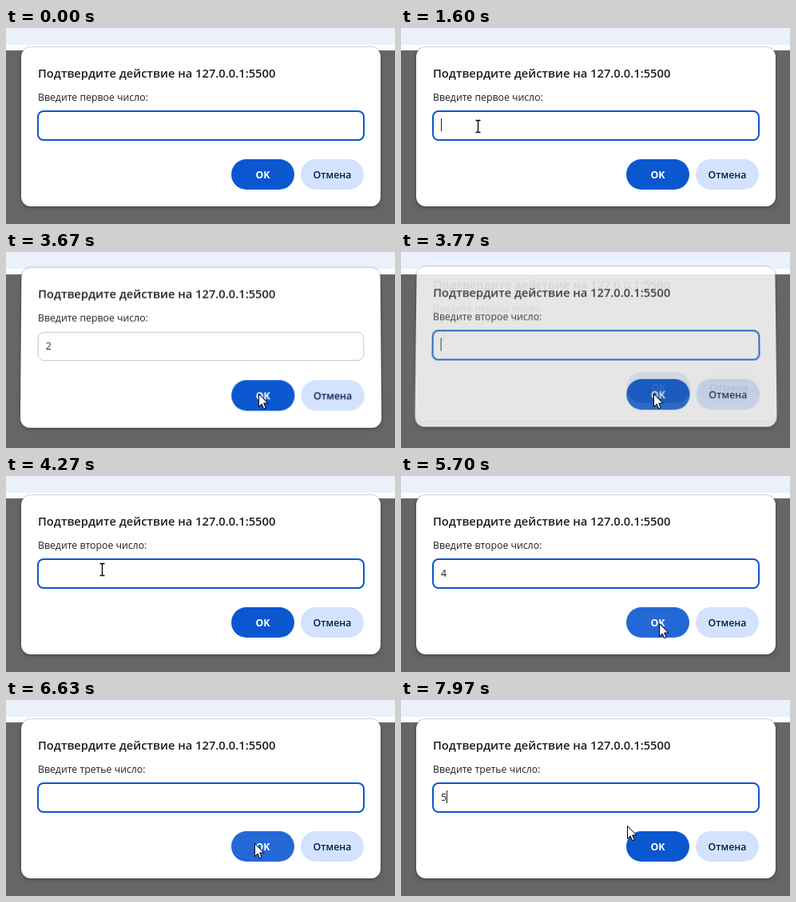
Recreate the animation shown at these times as an HTML page. Size 487 by 245 pixels, loop 8000 ms.

```html
<!DOCTYPE html>
<html lang="ru">
<head>
<meta charset="utf-8">
<title>Диалог</title>
<style>
html, body { margin: 0; width: 100%; height: 100%; overflow: hidden; }
body { position: relative; background: #666; font-family: "Open Sans", "Noto Sans", sans-serif; }
body * { position: absolute; box-sizing: border-box; white-space: pre; }
.bar { left: 0; top: 0; width: 100%; height: 28px; background: #fff; }
.bar i { left: 0; top: 0; width: 100%; height: 21px; background: #eaf1fb; }
.dialog {
  left: 19px; top: 24px; width: 450px; height: 199px; border-radius: 12px;
  background: #fff; box-shadow: 0 0 0 1px #0002, 0 2px 5px #0004; transform-origin: 50% 0;
  color: #1f1f1f; font-size: 12.3px; line-height: 20px;
}
.title { left: 21px; top: 22px; font-size: 14.72px; font-weight: 600; }
.label { left: 21px; top: 53px; }
.field { left: 20px; top: 79px; width: 410px; height: 38px; border: 2px solid #0b57d0; border-radius: 8px; }
.blur .field { left: 21px; top: 80px; width: 408px; height: 36px; border: 1px solid #c7c7c7; }
.value { left: 31px; top: 88px; }
.caret { top: 89px; width: 1px; height: 16px; background: #1f1f1f; }
.btn { top: 140px; width: 79px; height: 38px; border-radius: 19px; line-height: 39px; text-align: center; font-weight: 600; }
.ok { left: 263px; background: #0b57d0; color: #fff; font-weight: 700; }
.ok.hover { background: #2468d6; }
.cancel { left: 350px; background: #d3e3fd; color: #041e49; }
svg { left: 0; top: 0; overflow: visible; z-index: 5; }
</style>
</head>
<body>
<div class="bar"><i></i></div>
<svg width="1" height="1">
  <path id="arrow" d="M.5 .5V16.5L4.2 13L6.7 18.8L9.2 17.7L6.7 12H11.8Z" fill="#fff" stroke="#000"/>
  <g id="beam" fill="none">
    <path d="M-3 -7.5H-1L0 -6.5L1 -7.5H3M0 -7V7M-3 7.5H-1L0 6.5L1 7.5H3" stroke="#fff" stroke-width="2.4" opacity=".7"/>
    <path d="M-3 -7.5H-1L0 -6.5L1 -7.5H3M0 -7V7M-3 7.5H-1L0 6.5L1 7.5H3" stroke="#000" stroke-width="1.3"/>
  </g>
</svg>
<script>
const LOOP = 8000, BLINK = 525, SHOW_DELAY = 45, SHOW = 200, HIDE = 180, HOVER_DELAY = 140;

// caret: [on, off] spans before typing
const steps = [
  { word: 'первое', digit: '2', typed: 2730, press: 3530, close: 3633, caret: [[100, 630], [1130, 1650], [2200, 2730]] },
  { word: 'второе', digit: '4', typed: 5130, press: 5970, close: 6046, caret: [[3670, 4200], [4700, 5130]] },
  { word: 'третье', digit: '5', typed: 7700, press: 1e9, close: 1e9, caret: [[6090, 6615], [7140, 7665]] },
];

// pointer moves: start, end, from x, y, to x, y
const moves = [
  [300, 630, 128, 246, 96, 123],
  [1580, 2230, 96, 123, 190, 136],
  [3050, 3600, 190, 136, 316, 177],
  [3880, 4270, 316, 177, 121, 117],
  [5200, 5770, 121, 117, 323, 184],
  [6580, 7170, 323, 184, 152, 116],
  [7870, 7985, 152, 116, 283, 157],
];

const clamp = v => Math.max(0, Math.min(1, v));
const mix = (a, b, u) => a + (b - a) * u;
const easeOut = u => 1 - (1 - u) ** 2;
const smooth = u => u * u * (3 - 2 * u);

function add(parent, cls, text = '') {
  const el = document.createElement('div');
  el.className = cls;
  el.textContent = text;
  parent.append(el);
  return el;
}

steps.forEach((s, i) => {
  const root = s.root = add(document.body, 'dialog');
  root.style.zIndex = steps.length - i;
  add(root, 'title', 'Подтвердите действие на 127.0.0.1:5500');
  add(root, 'label', `Введите ${s.word} число:`);
  add(root, 'field');
  s.value = add(root, 'value', s.digit);
  s.bar = add(root, 'caret');
  s.ok = add(root, 'btn ok', 'OK');
  add(root, 'btn cancel', 'Отмена');
  s.open = i ? steps[i - 1].close + SHOW_DELAY : -SHOW - HOVER_DELAY;
});

function pointer(t) {
  let m = moves[0];
  for (const next of moves) if (t >= next[0]) m = next;
  const u = smooth(easeOut(clamp((t - m[0]) / (m[1] - m[0]))));
  return { x: mix(m[2], m[4], u), y: mix(m[3], m[5], u) };
}

const inside = (p, x0, y0, x1, y1) => p.x >= x0 && p.x <= x1 && p.y >= y0 && p.y <= y1;

function drawDialog(s, t, over) {
  const hide = clamp((t - s.close) / HIDE);
  const tilt = hide || 1 - easeOut(clamp((t - s.open) / SHOW));
  const alpha = hide ? clamp((0.82 - hide) / 0.6) : clamp(1.15 * (1 - tilt));
  const { root } = s;
  root.style.visibility = t >= s.open && hide < 1 ? 'visible' : 'hidden';
  root.style.opacity = alpha;
  root.style.transform = tilt
    ? `perspective(500px) translateY(${-20 * tilt}px) rotateX(${5 * tilt}deg) scale(${1 - 0.01 * tilt})`
    : 'none';

  const typed = t >= s.typed, pressed = t >= s.press;
  const lit = typed ? t < s.typed + BLINK : s.caret.some(([a, b]) => t >= a && t < b);
  root.classList.toggle('blur', pressed);
  s.value.style.display = typed ? '' : 'none';
  s.bar.style.display = lit && !pressed ? '' : 'none';
  s.bar.style.left = (typed ? 38 : 31) + 'px';
  s.ok.classList.toggle('hover', over && !hide && t >= s.open + SHOW + HOVER_DELAY);
}

const arrow = document.getElementById('arrow'), beam = document.getElementById('beam');

function draw(now) {
  const t = now % LOOP;
  const p = pointer(t);
  const text = inside(p, 40, 104, 449, 140);
  const over = inside(p, 282, 164, 361, 202);
  for (const s of steps) drawDialog(s, t, over);
  arrow.style.display = text || t < 320 ? 'none' : '';
  beam.style.display = text ? '' : 'none';
  const at = `translate(${Math.round(p.x)} ${Math.round(p.y)})`;
  arrow.setAttribute('transform', at);
  beam.setAttribute('transform', at + ' translate(-.5 0)');
}

const start = performance.now();
function tick() {
  draw(performance.now() - start);
  requestAnimationFrame(tick);
}
tick();
</script>
</body>
</html>
```
